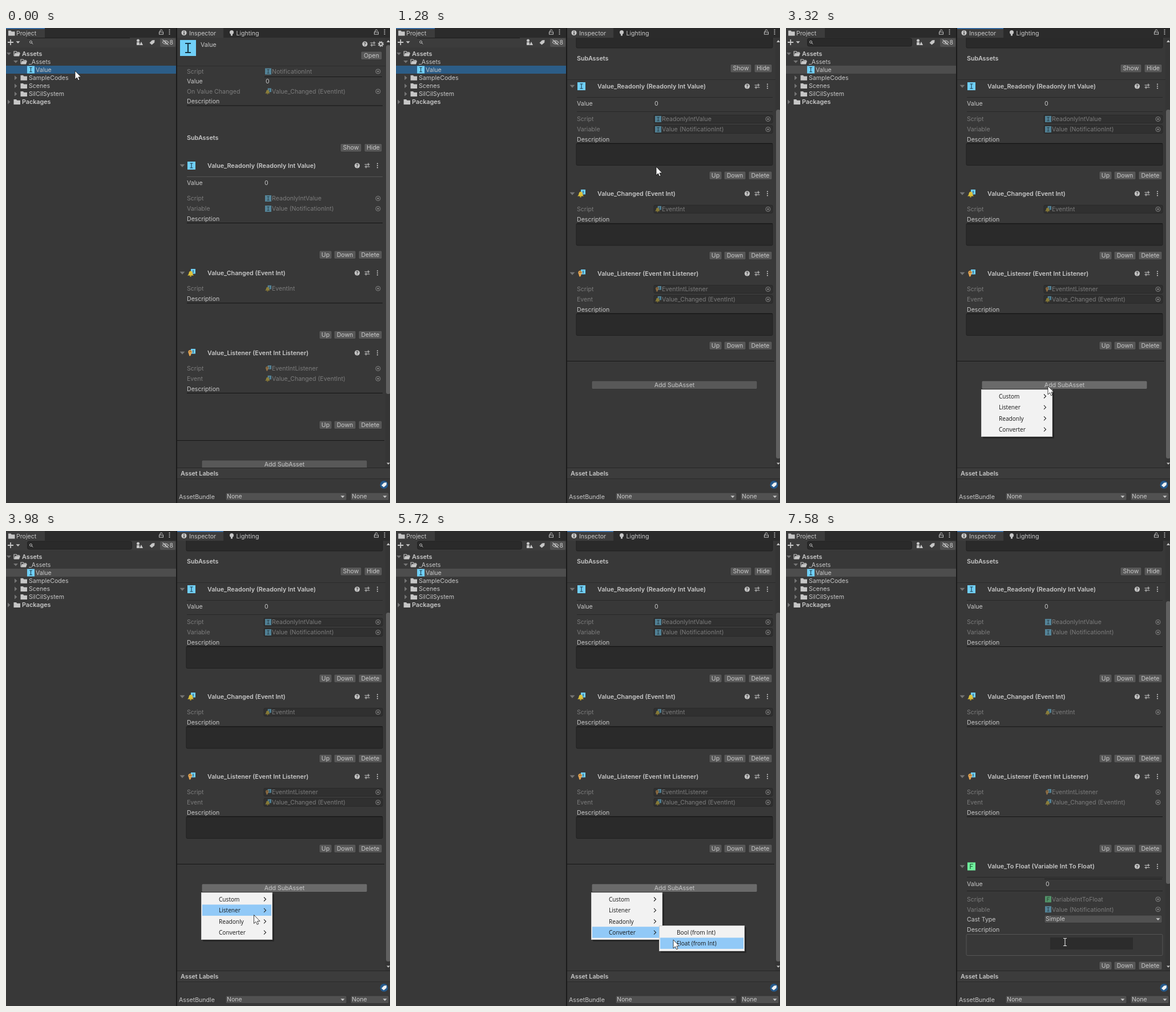
An HTML page that plays this animation: 673 px wide and 832 px high, repeating every 7680 ms.

```html
<!DOCTYPE html>
<html lang="en">
<head>
<meta charset="utf-8">
<title>Inspector</title>
<style>
html, body { margin: 0; width: 100%; height: 100%; overflow: hidden; background: #383838; }
svg { display: block; width: 673px; height: 832px; }
text { font: 10.6px Inter, sans-serif; fill: #c8c8c8; white-space: pre; }
.b { font-weight: 600; font-size: 10.74px; }
.dim { fill: #7c7c7c; }
.mid { text-anchor: middle; }
.menu text { font: 10.1px "Open Sans", sans-serif; fill: #161616; }
.boxed, .added, .right, .scrolled, svg.isScrolled .top, svg.isAdded .tail { display: none; }
svg.isBoxed .boxed, svg.isAdded .added, svg.isRight .right, svg.isScrolled .scrolled { display: inline; }
svg.isRight .left { display: none; }
#pick { fill: #2c5d87; }
svg.isRight #pick { fill: #4d4d4d; }
</style>
</head>
<body>
<svg id="stage" viewBox="0 0 673 832"></svg>
<script>
const INK = '#c6c6c6';
const rect = (x, y, w, h, fill, more = '') =>
  `<rect x="${x}" y="${y}" width="${w}" height="${h}" fill="${fill}" ${more}/>`;
const text = (x, y, s, cls = '') => `<text x="${x}" y="${y + 3.8}" class="${cls}">${s}</text>`;
const fill = (d, color = INK, more = '') => `<path d="${d}" fill="${color}" ${more}/>`;
const line = (d, color = INK, w = 1, more = '') =>
  `<path d="${d}" fill="none" stroke="${color}" stroke-width="${w}" ${more}/>`;
const dot = (x, y, r, color = INK, more = '') => `<circle cx="${x}" cy="${y}" r="${r}" fill="${color}" ${more}/>`;
const ring = (x, y, r, w = 1, color = INK) => dot(x, y, r, 'none', `stroke="${color}" stroke-width="${w}"`);
const group = (cls, s, more = '') => `<g class="${cls}" ${more}>${s}</g>`;

const down = (x, y, r = 4, color = INK) => fill(`M${x - r} ${y - r / 2}h${2 * r}l${-r} ${r * 1.1}Z`, color);
const side = (x, y) => fill(`M${x - 2} ${y - 4}v8l4.5 -4Z`, '#747474');
const kebab = (x, y) => [-3.5, 0, 3.5].map(d => dot(x, y + d, 1.1)).join('');
const lock = (x, y) => line(`M${x - 2} ${y}v-2a2 2 0 0 1 4 0`) + rect(x - 3.5, y, 7, 4, 'none', `stroke="${INK}"`);
const help = (x, y) => dot(x, y, 4.6) +
  `<text x="${x}" y="${y + 3}" class="b mid" style="font-size:8px;fill:#333">?</text>`;
const preset = (x, y) => line(`M${x - 4.5} ${y - 2}h9M${x - 4.5} ${y + 2}h9M${x + 2} ${y - 4.5}v5M${x - 2} ${y - .5}v5`, INK, 1.1);
const gear = (x, y) => ring(x, y, 2.8, 2) + dot(x, y, 4.4, 'none', `stroke="${INK}" stroke-width="1.5" stroke-dasharray="1.7 1.75"`);
const target = y => ring(652, y, 4, 1, '#858585') + dot(652, y, 1.5, '#858585');
const tag = (x, y, color = INK) =>
  fill(`M${x - 4.5} ${y + 1}L${x} ${y - 3.5}l4.5 -.5l-.3 4.5L${x - .5} ${y + 4.5}Z`, color);
const folder = (x, y, open) => open
  ? line(`M${x + 1} ${y + 4}v-8h4l1 1.6h4v2.4`, INK, 1.2) + fill(`M${x + 1} ${y + 4.6}l2 -5.8h9l-2 5.8Z`)
  : fill(`M${x} ${y + 4.5}v-9h4.5l1.3 1.7h5.7v7.3Z`);

const blue = '#70cff7', dark = '#183846';
const art = {
  int: rect(0, 0, 14, 14, blue) + line('M4.5 3h5M7 3v8M4.5 11h5', dark, 1.1),
  float: rect(0, 0, 14, 14, '#6ff09c') + line('M5 11.5V3h5M5 7h4', '#1d5a33', 1.2),
  mini: rect(6, 0, 8, 8.5, blue) + line('M10 2v5', dark),
  bell: fill('M0 11.5C2.5 10 2 8 3 5.5C4 3.3 7.5 3.3 8.5 5.5C9.5 8 9 10 11 11.5Z', '#dcc23c') + dot(5.5, 12.3, 1.5, '#b99a2b'),
  ear: fill('M1.5 7C.5 3 4 1.2 6.5 2.5C9.5 4 8 7.5 6.5 9C6 11 5.5 13 4 12.6C2.5 12 3 9 1.5 7Z', '#e5a653') +
    line('M3.5 6c0-2.5 3-2.5 3 0', '#72491d')
};
art.event = art.mini + art.bell;
art.listen = art.mini + art.ear;
const icon = (name, x, y, size, op = 1) =>
  `<g transform="translate(${x} ${y}) scale(${size / 14})" opacity="${op}">${art[name]}</g>`;

const button = (x, y, w, label, id = '') =>
  rect(x, y - 7, w, 14.5, '#585858', `rx="2" stroke="#303030" stroke-width=".8" ${id}`) +
  text(x + w / 2, y, label, 'mid');
const drop = (x, y, w, label) =>
  rect(x, y - 7, w, 13.5, '#515151', 'rx="2" stroke="#303030" stroke-width=".8"') +
  text(x + 2, y - .5, label) + down(x + w - 7, y, 3.5);

// Inspector rows
const prop = (y, label, art, value) => text(317, y, label, 'dim') +
  rect(452, y - 7, 208, 14, '#303030', 'class="boxed" rx="2" stroke="#292929"') +
  icon(art, 454, y - 5.5, 11, .5) + text(466, y, value, 'dim') + target(y);
const area = (y, cls = 'boxed') => text(317, y - 7, 'Description') +
  group(cls, rect(316, y, 344, 38.5, '#2a2a2a', 'rx="2" stroke="#202020"')) +
  rect(317, y, 343, 1, '#141414');
const tools = y => button(549, y, 22, 'Up') + button(575, y, 38, 'Down') + button(618, y, 41, 'Delete');
const head = (y, art, title) => down(309, y, 4.5, '#747474') + icon(art, 318, y - 7, 14) +
  text(353, y, title, 'b') + help(615.5, y) + preset(633, y) + kebab(651, y);

const content =
  icon('int', 305, 21, 28) + text(341, 29, 'Value') + help(629, 28) + preset(643, 28) + gear(657, 28) +
  button(622, 48, 37, 'Open') + rect(300, 66, 365, 1, '#2d2d2d') +
  prop(76, 'Script', 'int', 'NotificationInt') +
  text(317, 93.5, 'Value') + rect(453, 85, 206, 1, '#181818') + text(455, 93.5, '0') +
  prop(111, 'On Value Changed', 'event', 'Value_Changed (EventInt)') + area(135.5, 'scrolled') +
  text(317, 192, 'SubAssets', 'b') + button(586, 209.5, 37, 'Show') + button(628, 209.5, 31, 'Hide') +

  rect(300, 229, 365, 1, '#2b2b2b', 'class="scrolled"') +
  head(241, 'int', 'Value_Readonly (Readonly Int Value)') +
  rect(317, 260, 343, 1, '#555', 'class="top"') +
  rect(317, 260, 343, 1, '#272727', 'class="scrolled"') + rect(317, 285, 343, 1, '#272727', 'class="boxed"') +
  text(317, 271.5, 'Value') + text(453, 271.5, '0') +
  prop(298.5, 'Script', 'int', 'ReadonlyIntValue') +
  prop(316.5, 'Variable', 'int', 'Value (NotificationInt)') + area(341) + tools(397) +

  head(429, 'event', 'Value_Changed (Event Int)') +
  prop(456.3, 'Script', 'event', 'EventInt') + area(481.3) + tools(537.3) +

  head(569, 'listen', 'Value_Listener (Event Int Listener)') +
  prop(596.5, 'Script', 'listen', 'EventIntListener') +
  prop(614.3, 'Event', 'event', 'Value_Changed (EventInt)') + area(639) + tools(695) +

  group('tail', rect(300, 722, 363, 1, '#161616') + button(343, 764, 290, 'Add SubAsset', 'id="add"')) +
  group('added',
    head(726.5, 'float', 'Value_To Float (Variable Int To Float)') +
    rect(317, 745, 343, 1, '#272727') + rect(453, 748, 206, 1, '#1c1c1c') + rect(317, 769, 343, 1, '#222') +
    text(317, 757, 'Value') + text(455, 757, '0') +
    prop(784, 'Script', 'float', 'VariableIntToFloat') +
    prop(801.7, 'Variable', 'int', 'Value (NotificationInt)') +
    text(317, 819, 'Cast Type') + drop(453, 819, 206, 'Simple') +
    text(317, 837, 'Description') +
    rect(316, 845.5, 344, 37, 'none', 'rx="2" stroke="#555"') +
    rect(463, 851, 145, 21, '#2c2c2c') + tools(900));

const project =
  rect(0, 0, 298, 17, '#2b2b2b') + rect(0, 0, 68, 17, '#3c3c3c') + rect(0, 17, 298, 17, '#3c3c3c') +
  rect(0, 0, 68, 1.5, '#3a79bb', 'class="left"') +
  folder(4, 9) + text(18, 9, 'Project') + lock(272, 7) + kebab(286.5, 7) +
  line('M3 25h10M8 20v10', INK, 1.8) + down(21, 25, 3.5) +
  group('right', rect(37.5, 18, 183, 14, '#2a2a2a', 'rx="3" stroke="#212121"')) +
  rect(37, 17, 180, 1, '#1c1c1c', 'class="left"') +
  ring(43.5, 24.5, 2) + line('M45 26l2.3 2.3') +
  dot(231.5, 22, 2.5) + rect(229, 25, 5, 5, INK) + fill('M234 30l3 -6l3 6Z') + tag(256, 25) +
  rect(270, 18, 27, 15, '#505050', 'rx="2"') +
  line('M274 25q5.500 -6 11 0q-5.500 6 -11 0M274.500 20.500l10 9', INK, 1.1) + dot(279.5, 25, 1.6) + text(286.5, 25, '8') +
  rect(0, 66, 298, 14, '', 'id="pick"') +
  down(5, 45, 4, '#747474') + folder(13, 45, true) + text(28, 45, 'Assets', 'b') +
  down(17, 59, 4, '#747474') + folder(25, 59, true) + text(40, 59, '_Assets') +
  icon('int', 37, 66.5, 13) + text(52, 73, 'Value') +
  ['SampleCodes', 'Scenes', 'SilCilSystem'].map((s, i) => {
    const y = 87.3 + i * 14.1;
    return side(17, y) + folder(25.5, y) + text(40, y, s);
  }).join('') +
  side(5, 129.5) + folder(13.5, 129.5) + text(28, 129.5, 'Packages', 'b') +
  rect(298, 0, 2, 832, '#1b1b1b');

const frame =
  rect(300, 0, 373, 17, '#2b2b2b') + rect(300, 0, 81, 17, '#3c3c3c') +
  rect(300, 0, 81, 1.5, '#3a79bb', 'class="right"') +
  dot(312, 8.5, 4.6) + line('M312 7.500v4M312 5v1.500', '#333', 1.4) + text(321, 9, 'Inspector') +
  dot(395.5, 7.5, 3.5) + rect(394, 10.5, 3, 3, INK) + text(403.5, 9, 'Lighting') + lock(649, 7) + kebab(663.5, 7) +
  rect(665, 17, 8, 753, '#353535') + fill('M667 25h6l-3 -4Z') + down(670, 763, 3) +
  rect(666, 30, 8, 611, '#5f5f5f', 'id="thumb" rx="3.5"') +
  rect(300, 770, 373, 19, '#3c3c3c') + rect(300, 770, 373, 1, '#262626') + rect(300, 789, 373, 1, '#2b2b2b') +
  text(306, 780, 'Asset Labels', 'b') +
  dot(662.5, 800, 7, '#24598c') + tag(662.5, 800, '#f0f0f0') +
  text(303, 821, 'AssetBundle') + drop(385, 821, 212, 'None') + drop(604, 821, 67, 'None');

const popup = (id, x, y, w, h, items, textX, arrows) => group('menu',
  rect(x + 3, y + 3, w, h, '#000', 'opacity=".3" rx="1"') +
  rect(x + .5, y + .5, w - 1, h - 1, '#f2f2f2', 'stroke="#cfcfcf"') +
  rect(x + 2, 0, w - 4, 19.5, '#91c9f7', `id="${id}Hot"`) +
  items.map((s, i) => {
    const cy = y + 12 + i * 19.4;
    return text(textX, cy, s) + (arrows ? line(`M452 ${cy - 3.5}l3.500 3.500l-3.500 3.500`, '#222', 1.1) : '');
  }).join(''), `id="${id}"`);

const $ = id => document.getElementById(id);
const stage = $('stage');
stage.innerHTML =
  '<clipPath id="view"><rect x="300" y="17" width="365" height="753"/></clipPath>' +
  rect(0, 0, 673, 832, '#383838') + project +
  `<g clip-path="url(#view)"><g id="scroll">${content}</g></g>` + frame +
  popup('main', 342, 633, 125, 83, ['Custom', 'Listener', 'Readonly', 'Converter'], 373, true) +
  popup('sub', 461, 691, 150, 45, ['Bool (from Int)', 'Float (from Int)'], 492, false) +
  group('', fill('M0 0V15L3.400 11.800L5.600 16.800L8 15.800L5.900 10.900H10.500Z', '#fff',
    'stroke="#111" stroke-width=".8"'), 'id="arrow"') +
  group('', line('M-3 -6.500h2q1 0 1 1q0 -1 1 -1h2M0 -5.500v11M-3 6.500h2q1 0 1 -1q0 1 1 1h2', '#e8e8e8', 1.1), 'id="beam"');

const LOOP = 7680, STEP = 92.5;
// Ticks come every STEP, rounded down to 20 ms.
const start = k => 20 * Math.floor((k * STEP + 3) / 20);
function tickAt(t) {
  let k = Math.ceil(t / STEP) + 1;
  while (k > 0 && start(k) > t) k--;
  return k;
}

// tick, x, y of the pointer
const path = [[0, 121, 75], [3, 121, 75], [12, 456, 242], [13, 456, 243], [18, 456, 243], [27, 458, 586],
  [29, 459, 610], [32, 459, 627], [38, 459, 627], [47, 417, 705], [48, 417, 706], [56, 417, 706],
  [60, 470, 707], [62, 486, 716], [63, 487, 719], [99, 487, 719]];
function pointer(k) {
  const i = path.findIndex(p => p[0] > k);
  const [a, x, y] = path[i - 1], [b, x2, y2] = path[i];
  const u = (k - a) / (b - a), e = u * u * (3 - 2 * u);
  return [x + (x2 - x) * e, y + (y2 - y) * e];
}
const set = (id, name, v) => $(id).setAttribute(name, v);
const show = (id, op) => { $(id).style.opacity = op; };
const fade = (k, from, to) => k < from || k >= to ? 0 : k === from ? .6 : 1;

function hot(id, top, row, on) {
  set(id, 'y', top + 2 + row * 19.4);
  show(id, on ? 1 : 0);
}

let last = -1;
function draw(k) {
  const [x, y] = pointer(k);
  const scroll = k < 13 ? 0 : k < 14 ? 70 : 139;
  const added = k >= 68;
  const state = { isScrolled: k >= 13, isBoxed: k >= 13 && !added, isRight: k >= 34, isAdded: added };
  stage.setAttribute('class', Object.keys(state).filter(s => state[s]).join(' '));
  set('scroll', 'transform', `translate(0 ${-scroll})`);
  set('thumb', 'y', added ? 123 : 30 + scroll * 113 / 139);
  set('thumb', 'height', added ? 495 : 611);
  set('add', 'fill', k >= 31 && k < 66 ? '#6a6a6a' : '#585858');

  show('main', fade(k, 35, 66));
  show('sub', fade(k, 51, 66));
  hot('mainHot', 633, k >= 48 ? 3 : Math.min(3, Math.floor((y - 635) / 19.4)), y >= 635);
  hot('subHot', 691, y > 713 ? 1 : 0, k > 56 && x > 462);

  set('arrow', 'transform', `translate(${x} ${y})`);
  set('beam', 'transform', `translate(${k < 79 ? 487 : k < 82 ? 488 : 489} 720)`);
  show('arrow', k < 69 ? 1 : 0);
  show('beam', k < 69 ? 0 : 1);
}

const begin = performance.now();
function run() {
  const k = tickAt((performance.now() - begin) % LOOP);
  if (k !== last) draw(last = k);
  requestAnimationFrame(run);
}
run();
</script>
</body>
</html>
```
